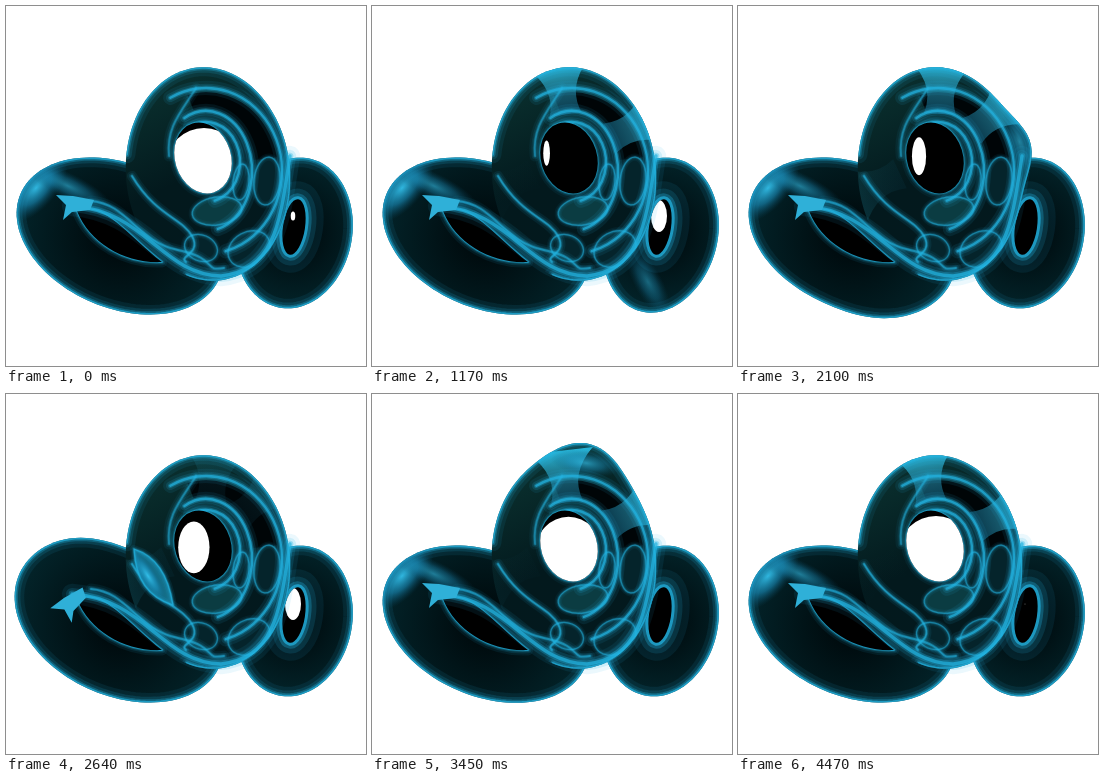
Animation of 360x360 px, one loop 4.5 s. Source, as an HTML page with a canvas:

```html
<!DOCTYPE html>
<html lang="en">
<head>
<meta charset="utf-8">
<title>Glass knot</title>
<style>
html, body { margin: 0; width: 100%; height: 100%; overflow: hidden; background: #fff; }
canvas { display: block; width: 360px; height: 360px; }
</style>
</head>
<body>
<canvas id="stage" width="360" height="360"></canvas>
<script>
const ctx = document.getElementById('stage').getContext('2d');
const LOOP = 4500, STEP = 30, TURN = 2730, REST = 480, RAD = Math.PI / 180;

// Each tube is a tilted ellipse; its swelling runs between two angles during a span of time
const LEFT = { x: 114, y: 230, rx: 108, ry: 72, tilt: .4, span: [2000, 2900], arc: [54, 281], height: 12, width: 24 };
const RIGHT = { x: 288, y: 227, rx: 58, ry: 76, tilt: .2, span: [1080, 1650], arc: [123, -123], height: 10, width: 24 };
const RING = { x: 202, y: 168, rx: 82, ry: 107, tilt: -.1, span: [1750, 2300], arc: [-202, 60], height: 14, width: 15 };

const clamp = v => Math.max(0, Math.min(1, v));
const mix = (a, b, k) => a + (b - a) * k;
const smooth = v => { const k = clamp(v); return k * k * (3 - 2 * k); };

function swelling({ span, arc, height }, m) {
  const k = clamp((m - span[0]) / (span[1] - span[0]));
  return { angle: mix(arc[0], arc[1], smooth(k)) * RAD, height: height * Math.sin(Math.PI * k) };
}

// Outline from a start angle over part of a turn, pushed out at the swelling
function outline(tube, m, from = 0, turn = 1) {
  const s = swelling(tube, m), c = Math.cos(tube.tilt), d = Math.sin(tube.tilt);
  const path = new Path2D();
  for (let i = 0; i <= 120; i++) {
    const a = from * RAD + i / 120 * turn * 2 * Math.PI;
    const ex = tube.rx * Math.cos(a), ey = tube.ry * Math.sin(a);
    const x = ex * c - ey * d, y = ex * d + ey * c;
    const dir = Math.atan2(y, x), off = dir - s.angle;
    const gap = Math.atan2(Math.sin(off), Math.cos(off)) / (tube.width * RAD);
    const push = s.height * Math.exp(-gap * gap / 2);
    path.lineTo(tube.x + x + push * Math.cos(dir), tube.y + y + push * Math.sin(dir));
  }
  return path;
}

function oval(x, y, rx, ry, tilt = 0, from = 0, to = 360) {
  const path = new Path2D();
  path.ellipse(x, y, Math.max(0, rx), Math.max(0, ry), tilt, from * RAD, to * RAD);
  return path;
}

function within(path, draw) {
  ctx.save();
  ctx.clip(path);
  draw();
  ctx.restore();
}

function glow(path, width, power = 1) {
  for (const [w, a] of [[6, .09], [3.6, .15], [2, .3], [1, .7]]) {
    ctx.lineWidth = width * w;
    ctx.strokeStyle = `rgba(35,180,225,${a * power})`;
    ctx.stroke(path);
  }
}

function shine(x, y, rx, ry, tilt, power) {
  ctx.save();
  ctx.translate(x, y);
  ctx.rotate(tilt);
  ctx.scale(rx, ry);
  const g = ctx.createRadialGradient(0, 0, 0, 0, 0, 1);
  g.addColorStop(0, `rgba(50,190,232,${power})`);
  g.addColorStop(.5, `rgba(25,140,185,${.65 * power})`);
  g.addColorStop(1, 'rgba(10,80,110,0)');
  ctx.fillStyle = g;
  ctx.fillRect(-1, -1, 2, 2);
  ctx.restore();
}

function body(path, tube) {
  const r = Math.max(tube.rx, tube.ry);
  const g = ctx.createRadialGradient(tube.x, tube.y, r * .2, tube.x, tube.y, r);
  g.addColorStop(0, '#000c0f');
  g.addColorStop(1, '#03242a');
  ctx.fillStyle = g;
  ctx.fill(path);
}

// Light caught across the ring's tube, wide at both edges and thin between
function band(angle, power) {
  ctx.save();
  ctx.translate(200, 150);
  ctx.rotate(angle * RAD);
  const g = ctx.createLinearGradient(42, 0, 92, 0);
  g.addColorStop(0, `rgba(20,110,145,${.6 * power})`);
  g.addColorStop(.5, `rgba(40,150,180,${.7 * power})`);
  g.addColorStop(1, `rgba(45,200,238,${power})`);
  ctx.fillStyle = g;
  ctx.beginPath();
  ctx.moveTo(94, -32);
  ctx.quadraticCurveTo(70, -6, 42, -16);
  ctx.lineTo(42, 16);
  ctx.quadraticCurveTo(70, 6, 94, 32);
  ctx.fill();
  ctx.restore();
}

const leftHole = new Path2D('M71 205 C100 196 118 226 156 256 C120 258 84 238 71 205Z');
const rightHole = oval(288, 221, 11, 28, .15);
const ringHole = oval(197, 152, 28, 36, -.3);
const sweep = new Path2D('M284 150 C274 215 270 264 215 270 C155 268 140 205 66 200');
const rib = new Path2D('M85 195 C122 198 130 235 172 244 S196 266 218 262');
const seam = new Path2D('M126 170 C150 210 176 212 186 230 S172 250 180 256');
const fold = new Path2D('M163 150 C160 120 176 105 190 82');
const facet = new Path2D('M50 189 L67 190 L88 194 L84 204 L66 206 L57 214 L60 199Z');
const leaf = new Path2D('M128 155 Q160 165 167 211 Q130 200 128 155Z');
const rings = [[34, 40, 156], [46, 60, 165], [76, 83, 165]].map(([rx, ry, y]) => oval(200, y, rx, ry, 0, -118, 75));
const pads = [[261, 175, 13, 24, .1], [243, 243, 22, 17, -.5], [195, 242, 17, 13, .4], [235, 176, 8, 18, .1], [211, 205, 25, 14, -.15]]
  .map(p => oval(...p));
const crescent = new Path2D();
crescent.ellipse(200, 165, 72, 79, 0, -105 * RAD, -10 * RAD);
crescent.ellipse(200, 165, 48, 63, 0, -10 * RAD, -105 * RAD, true);

function opening(path, white) {
  ctx.fillStyle = '#000';
  ctx.fill(path);
  within(path, () => {
    ctx.fillStyle = '#fff';
    ctx.fill(white);
  });
}

function drawRight(m, t) {
  const path = outline(RIGHT, m);
  body(path, RIGHT);
  within(path, () => {
    glow(path, 3.2);
    shine(276, 276, 14, 38, -.5, swelling(RIGHT, m).height / RIGHT.height * clamp((1400 - m) / 200));
    glow(rightHole, 6);
  });
  const peek = Math.cos((t - 1170) / 1470 * 2 * Math.PI);
  opening(rightHole, oval(287, 210, 8 * peek, 16 * peek));
}

function drawLeft(m, lift) {
  const path = outline(LEFT, m);
  body(path, LEFT);
  within(path, () => {
    glow(path, 3.2);
    shine(30, 182, 42, 20, -.85, .95 * (1 - lift));
    shine(62, 180, 48, 13, .45, .6 * (1 - lift));
  });
}

function drawRing(m, t) {
  const path = outline(RING, m);
  const g = ctx.createLinearGradient(140, 65, 240, 270);
  g.addColorStop(0, '#0b3331');
  g.addColorStop(.5, '#03191d');
  g.addColorStop(1, '#03191e');
  ctx.fillStyle = g;
  ctx.fill(path);
  within(path, () => {
    ctx.fillStyle = '#000507';
    ctx.fill(crescent);

    // Two bands swing against each other, a third lights up below as they part
    const swing = Math.cos(t / 1125 * 2 * Math.PI);
    const power = clamp(Math.min(t, Math.abs(t - TURN)) / 500);
    band(-62 + 38 * swing, .85 * power);
    band(-62 - 38 * swing, .85 * power);
    band(155, .4 * power * (1 - swing));

    const s = swelling(RING, m);
    shine(RING.x + 84 * Math.cos(s.angle), RING.y + 100 * Math.sin(s.angle), 13, 36, s.angle, s.height / RING.height * .7);

    pads.forEach((pad, i) => {
      ctx.fillStyle = i < 4 ? '#05242b' : '#0b3c42';
      ctx.fill(pad);
      glow(pad, 1.2, .7);
    });
    for (const ring of rings) glow(ring, 2.4);
    glow(fold, 1.8, .7);
    glow(outline(RING, m, 195, .77), 3);
  });
  glow(ringHole, 1.8, .7);
  const o = Math.max(1 - smooth((t - 700) / 470), .1 + .9 * smooth((t - 1170) / 2700));
  opening(ringHole, oval(172 + 26 * o, 146 + 12 * o, 3 + 34 * o * o, 10 + 26 * o));
}

function drawFront(lift) {
  glow(leftHole, 1.8, .9);
  ctx.fillStyle = '#000';
  ctx.fill(leftHole);
  glow(seam, 1.7, .9);
  glow(rib, 1.8, .8);
  glow(sweep, 3.4);

  ctx.save();
  ctx.translate(70 - 4 * lift, 199 + 10 * lift);
  ctx.rotate(-.7 * lift);
  ctx.translate(-70, -199);
  ctx.fillStyle = '#2fb0d8';
  ctx.fill(facet);
  ctx.restore();

  ctx.save();
  ctx.globalAlpha = lift;
  ctx.fillStyle = '#14708a';
  ctx.fill(leaf);
  within(leaf, () => shine(142, 182, 32, 9, 1, 1));
  glow(leaf, 1.3);
  ctx.restore();
}

function draw(t) {
  // The swelling runs out along the tube and back again
  const m = t < REST ? 2 * REST - t : TURN - Math.abs(t - TURN);
  const lift = smooth((m - 2450) / 170);
  ctx.clearRect(0, 0, 360, 360);
  ctx.lineJoin = ctx.lineCap = 'round';
  drawRight(m, t);
  drawLeft(m, lift);
  drawRing(m, t);
  drawFront(lift);
}

const start = performance.now();
function tick() {
  const t = (performance.now() - start) % LOOP;
  draw(Math.floor(t / STEP) * STEP);
  requestAnimationFrame(tick);
}
tick();
</script>
</body>
</html>
```
